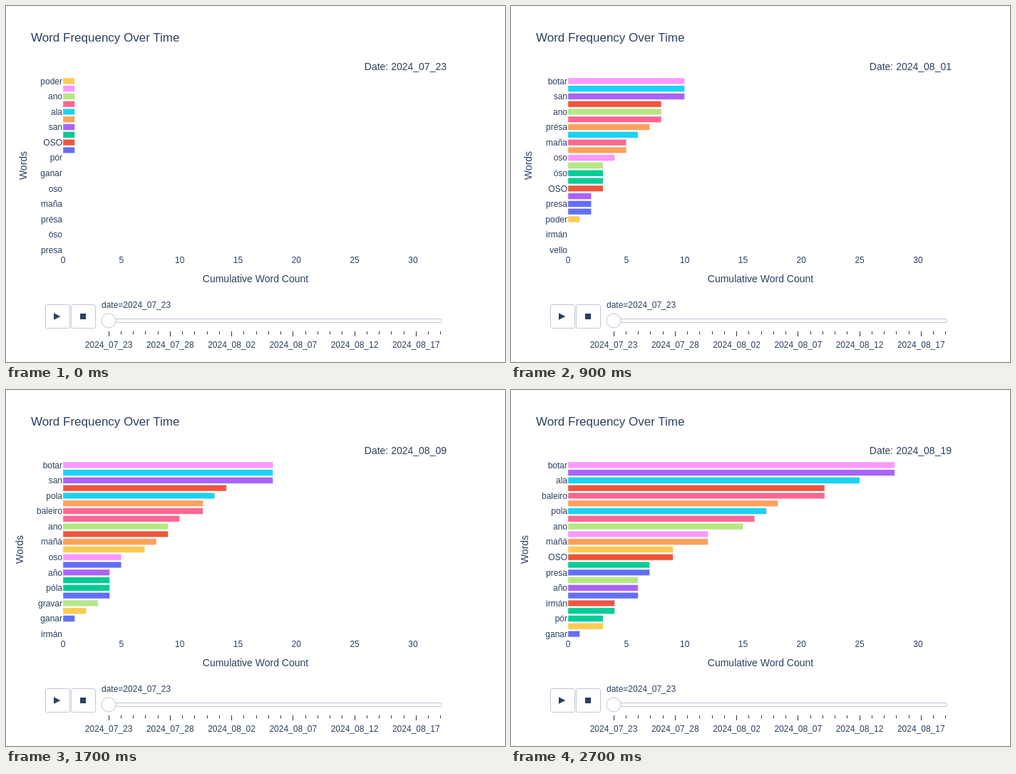
An HTML page that plays this animation: 700x500 px, repeating every 2800 ms.

```html
<!DOCTYPE html>
<html lang="en">
<head>
<meta charset="utf-8">
<title>Word Frequency Over Time</title>
<style>
  html, body { margin: 0; width: 100%; height: 100%; overflow: hidden; background: #fff; }
  svg { display: block; width: 700px; height: 500px; }
  text { font: 12px "Liberation Sans", Arial, sans-serif; fill: #2a3f5f; white-space: pre; }
  .title { font-size: 17px; }
  .axis { font-size: 14px; }
  .mid { text-anchor: middle; }
  .end { text-anchor: end; }
  .box { fill: #fff; stroke: #bec8d9; }
  .bar { stroke: #e5ecf6; stroke-width: .5; }
  .tick { fill: #333; shape-rendering: crispEdges; }
  .icon { fill: #2a3f5f; }
</style>
</head>
<body>
<svg id="stage" viewBox="0 0 700 500"></svg>
<script>
const STEP = 100, DAYS = 28, LEFT = 80, TOP = 100;
const UNIT = 540 / 33, PITCH = 248 / 23, BAR = PITCH * 0.8;
const COLORS = ['#636efa', '#ef553b', '#00cc96', '#ab63fa', '#ffa15a',
                '#19d3f3', '#ff6692', '#b6e880', '#ff97ff', '#fecb52'];

// Cumulative counts on the key days; days between are interpolated.
const KEYS = [0, 4, 9, 12, 17, 21, 27];
const words = [
  ['mais', 2, 2, 2, 4, 5, 6],
  ['OSO', 2, 3, 6, 9, 9, 9],
  ['póla', 3, 3, 3, 4, 4, 4],
  ['san', 5, 10, 13, 18, 22, 28],
  ['mañá', 5, 5, 6, 8, 11, 12],
  ['ala', 5, 10, 13, 18, 22, 25],
  ['baleiro', 5, 8, 8, 12, 16, 22],
  ['ano', 3, 8, 9, 9, 10, 15],
  ['botar', 5, 10, 13, 18, 22, 28],
  ['poder', 1, 1, 2, 7, 9, 9],
  ['presa', 2, 2, 2, 5, 6, 7],
  ['máis', 3, 8, 11, 14, 17, 22],
  ['óso', 3, 3, 3, 4, 6, 7],
  ['año', 2, 2, 4, 4, 5, 6],
  ['présa', 2, 7, 10, 12, 13, 18],
  ['pola', 2, 6, 9, 13, 17, 17],
  ['maña', 0, 5, 7, 10, 11, 16],
  ['gravar', 0, 3, 3, 3, 4, 6],
  ['oso', 0, 4, 4, 5, 7, 12],
  ['vello', 0, 0, 2, 2, 3, 3],
  ['ganar', 0, 0, 0, 1, 1, 1],
  ['irmán', 0, 0, 0, 0, 0, 4],
  ['pór', 0, 0, 0, 0, 0, 3]
].map(([name, ...counts], id) => ({
  id, name,
  color: COLORS[id % 10],
  counts: [id < 10 ? 1 : 0, ...counts],
  bias: name === 'año' ? 0.2 : 0.5
}));

const stage = document.getElementById('stage');

function add(tag, attrs, content = '') {
  const el = document.createElementNS('http://www.w3.org/2000/svg', tag);
  for (const key in attrs) el.setAttribute(key, attrs[key]);
  el.textContent = content;
  return stage.appendChild(el);
}
const label = (x, y, content, cls = '') => add('text', { x, y, class: cls }, content);
const rect = (x, y, width, height, cls, rx = 0) =>
  add('rect', { x, y, width, height, rx, class: cls });

function dateOf(day) {
  const n = 23 + day;
  const [month, date] = n > 31 ? ['08', n - 31] : ['07', n];
  return `2024_${month}_${String(date).padStart(2, '0')}`;
}

function countOn(word, day) {
  let k = 0;
  while (k < KEYS.length - 2 && KEYS[k + 1] <= day) k++;
  const [a, b] = word.counts.slice(k, k + 2);
  const part = (day - KEYS[k]) / (KEYS[k + 1] - KEYS[k]);
  return Math.floor(a + (b - a) * part + word.bias);
}

// Chart
label(35, 50, 'Word Frequency Over Time', 'title');
const dateText = label(618, 90, '', 'axis end');
const bars = words.map((_, i) =>
  rect(LEFT, TOP + PITCH * (i + 0.5) - BAR / 2, 0, BAR, 'bar'));
const names = words.filter((_, i) => i % 2 === 0).map((_, i) =>
  label(79, TOP + PITCH * (2 * i + 0.5) + 4.2, '', 'end'));
for (let n = 0; n <= 30; n += 5) label(LEFT + n * UNIT, 361, n, 'mid');
label(350, 388, 'Cumulative Word Count', 'axis mid');
const wordsTitle = label(0, 0, 'Words', 'axis mid');

// Buttons
rect(55.5, 419.5, 34, 33, 'box', 2);
rect(91.5, 419.5, 34, 33, 'box', 2);
add('path', { d: 'M67 431.3L76.4 436L67 440.7Z', class: 'icon' });
rect(104, 432, 8, 8, 'icon');

// Slider
label(134, 424, 'date=' + dateOf(0));
rect(134.5, 439.5, 477, 5, 'box', 2);
add('circle', { cx: 144, cy: 442, r: 10, class: 'box' });
for (let day = 0; day < DAYS; day++) {
  const x = 144 + day * 17.25, major = day % 5 === 0;
  rect(Math.floor(x), 457, 1, major ? 7 : 4, 'tick');
  if (major) label(x, 480, dateOf(day), 'mid');
}

function draw(day) {
  const ranked = words
    .map(w => ({ ...w, count: countOn(w, day) }))
    .sort((a, b) => b.count - a.count || b.id - a.id);
  ranked.forEach((w, i) => {
    bars[i].setAttribute('width', w.count * UNIT);
    bars[i].setAttribute('fill', w.color);
    if (i % 2 === 0) names[i / 2].textContent = w.name;
  });
  dateText.textContent = 'Date: ' + dateOf(day);
  // The axis title keeps clear of the widest visible name.
  const widest = Math.max(...names.map(n => n.getComputedTextLength()));
  wordsTitle.setAttribute('transform', `translate(${59.8 - widest} 224) rotate(-90)`);
}

const start = performance.now();
let shown = -1;
function tick() {
  const day = Math.floor(Math.max(0, performance.now() - start) / STEP) % DAYS;
  if (day !== shown) draw(shown = day);
  requestAnimationFrame(tick);
}
tick();
</script>
</body>
</html>
```
